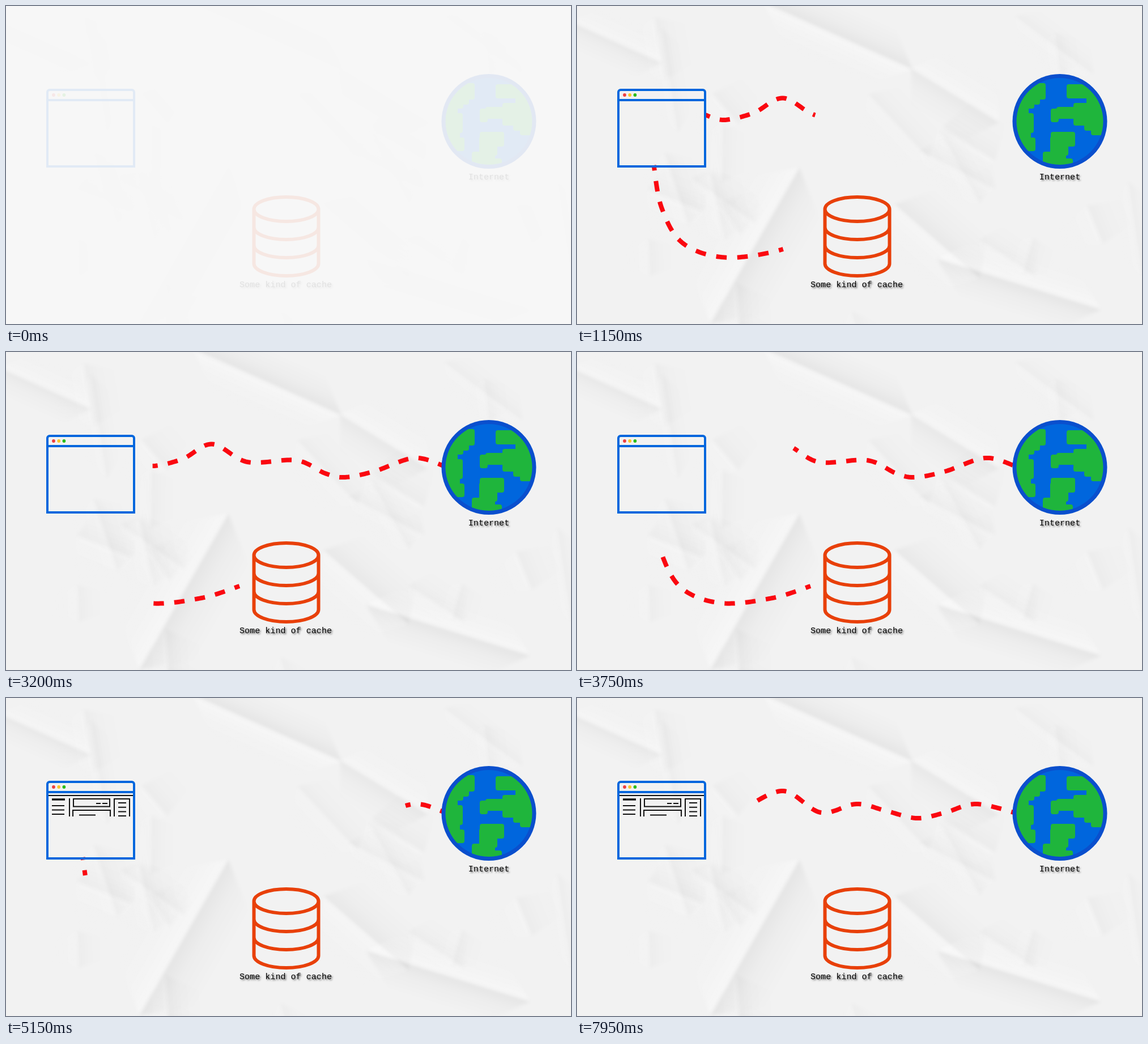
Animation, 997 px wide and 561 px high, one loop 8 s. Source, as an HTML page with a canvas:

```html
<!DOCTYPE html>
<html lang="en">
<head>
<meta charset="utf-8">
<title>Browser, cache and internet</title>
<style>
  html, body { margin: 0; width: 100%; height: 100%; overflow: hidden; background: #f8f8f8; }
  canvas { display: block; }
</style>
</head>
<body>
<canvas id="stage" width="997" height="561"></canvas>
<script>
const W = 997, H = 561, LOOP = 8000, STEP = 50;
const BLUE = '#0066dd', RED = '#fa0810', ORANGE = '#e8400a', GREEN = '#1fb53c', INK = '#111';
const ctx = document.getElementById('stage').getContext('2d');
const clamp01 = v => Math.min(1, Math.max(0, v));

// ---------- paper ----------

function seeded(seed) {
  return () => {
    seed = (seed * 1664525 + 1013904223) >>> 0;
    return seed / 2 ** 32;
  };
}

const gray = (v, alpha) => `rgba(${v},${v},${v},${alpha})`;

// shades one side of a fold, fading away from it
function shadeFold(g, x1, y1, x2, y2, w, tone, alpha) {
  const dx = x2 - x1, dy = y2 - y1, len = Math.hypot(dx, dy);
  const nx = -dy / len * w, ny = dx / len * w;
  const fade = g.createLinearGradient(x1, y1, x1 + nx, y1 + ny);
  fade.addColorStop(0, gray(tone, alpha));
  fade.addColorStop(.4, gray(tone, alpha * .4));
  fade.addColorStop(1, gray(tone, 0));
  g.fillStyle = fade;
  g.beginPath();
  g.moveTo(x1, y1);
  g.lineTo(x2, y2);
  g.lineTo(x1 + dx * .8 + nx, y1 + dy * .8 + ny);
  g.lineTo(x1 + dx * .2 + nx, y1 + dy * .2 + ny);
  g.fill();
}

function fold(g, x1, y1, x2, y2, w, depth) {
  shadeFold(g, x1, y1, x2, y2, -w, 0, depth);
  shadeFold(g, x1, y1, x2, y2, w, 255, depth * 8);
}

function makePaper() {
  const sheet = document.createElement('canvas');
  sheet.width = W;
  sheet.height = H;
  const g = sheet.getContext('2d');
  g.fillStyle = '#f2f2f2';
  g.fillRect(0, 0, W, H);
  g.filter = 'blur(3px)';
  const rnd = seeded(11);
  for (let i = 0; i < 24; i++) {
    const x = rnd() * W, y = rnd() * H, a = .3 + rnd() * 1.6, len = 60 + rnd() * 130;
    fold(g, x, y, x + len * Math.cos(a), y + len * Math.sin(a), 30 + rnd() * 50, .022);
  }
  // the deepest folds
  fold(g, 330, -5, 592, 112, 55, .05);
  fold(g, -10, 28, 150, 100, -45, .04);
  fold(g, 392, 285, 235, 560, 80, .05);
  fold(g, 560, 350, 710, 480, 70, .04);
  fold(g, 925, 535, 635, 445, 55, .05);
  fold(g, 590, 110, 745, 205, -60, .04);
  return sheet;
}

// ---------- dashed routes ----------

// Catmull-Rom curve through the points, with running length
function curve(pts) {
  const out = [];
  const at = i => pts[Math.min(pts.length - 1, Math.max(0, i))];
  for (let i = 0; i < pts.length - 1; i++) {
    const [a, b, c, d] = [at(i - 1), at(i), at(i + 1), at(i + 2)];
    for (let n = i ? 1 : 0; n <= 24; n++) {
      const u = n / 24;
      const mix = k => .5 * (2 * b[k] + (c[k] - a[k]) * u +
        (2 * a[k] - 5 * b[k] + 4 * c[k] - d[k]) * u * u +
        (3 * b[k] - a[k] - 3 * c[k] + d[k]) * u ** 3);
      const x = mix(0), y = mix(1), last = out[out.length - 1];
      out.push({ x, y, s: last ? last.s + Math.hypot(x - last.x, y - last.y) : 0 });
    }
  }
  return out;
}

function route(pts, dashes, draw, erase) {
  const line = curve(pts);
  const length = line[line.length - 1].s;
  return { line, length, period: length / dashes, draw, erase };
}

const toInternet = [[226, 192], [260, 201], [312, 188.5], [364, 162.5], [426, 194],
  [512, 191], [563, 214], [597, 221], [650, 210.5], [720, 187], [773, 201]];
const fromInternet = [[775, 203], [704, 187], [650, 202], [600, 212], [545, 199],
  [493, 187], [430, 202], [364, 164], [295, 195]];
const toCache = [[135.5, 281], [149, 355], [185, 417], [255, 443], [345, 434], [435, 403]];
const fromCache = [[412, 413], ...toCache.slice(0, -1).reverse()];

const ROUTES = [
  route(toInternet, 16, [50, 3050], [3060, 5440]),
  route(toCache, 11, [50, 1400], [1400, 2750]),
  route(fromCache, 10.5, [2675, 3965], [3968, 5258]),
  route(fromInternet, 14, [6250, 8034], [LOOP, LOOP + 1])
];

function drawRoute({ line, length, period, draw, erase }, t) {
  const along = ([from, to]) => length * clamp01((t - from) / (to - from));
  const head = along(draw), tail = along(erase);
  if (head <= tail) return;
  ctx.beginPath();
  for (let i = 1; i < line.length; i++) {
    const a = line[i - 1], b = line[i];
    if (b.s <= tail || a.s >= head) continue;
    const point = s => {
      const u = clamp01((s - a.s) / (b.s - a.s));
      return [a.x + (b.x - a.x) * u, a.y + (b.y - a.y) * u];
    };
    if (a.s <= tail) ctx.moveTo(...point(tail));
    ctx.lineTo(...point(head));
  }
  ctx.strokeStyle = RED;
  ctx.lineWidth = 8;
  ctx.setLineDash([period / 2, period / 2]);
  ctx.lineDashOffset = period / 4;
  ctx.stroke();
  ctx.setLineDash([]);
}

// ---------- icons ----------

function disc(x, y, r, color) {
  ctx.fillStyle = color;
  ctx.beginPath();
  ctx.arc(x, y, r, 0, 2 * Math.PI);
  ctx.fill();
}

function stroke(width, color, trace) {
  ctx.strokeStyle = color;
  ctx.lineWidth = width;
  ctx.beginPath();
  trace();
  ctx.stroke();
}

function rule(x1, x2, y) {
  ctx.moveTo(x1, y);
  ctx.lineTo(x2, y);
}

// a box open at the bottom
function bracket(x1, x2, top, bottom) {
  ctx.moveTo(x1, bottom);
  ctx.lineTo(x1, top);
  ctx.lineTo(x2, top);
  ctx.lineTo(x2, bottom);
}

function drawPage() {
  stroke(3.5, INK, () => rule(81, 104, 179));
  stroke(2, INK, () => {
    rule(75, 224, 172);
    for (let i = 0; i < 3; i++) rule(81, 103, 190 + 7.5 * i);
    for (let i = 0; i < 4; i++) rule(198, 212, 185 + 7.7 * i);
    ctx.moveTo(112, 177);
    ctx.lineTo(112, 209);
    ctx.rect(119, 178, 64, 13.5);
    rule(159, 167, 186);
    rule(170, 179, 186);
    bracket(118, 184, 198, 209);
    rule(129, 158, 206.5);
    bracket(191, 218, 178, 209);
  });
}

function drawBrowser(loaded) {
  if (loaded) drawPage();
  stroke(4, BLUE, () => {
    ctx.roundRect(73, 148, 153, 135, [4, 4, 0, 0]);
    rule(73, 226, 166);
  });
  ['#ee4040', '#fbc62c', '#2cbd1c'].forEach((color, i) => disc(84 + 9.2 * i, 157, 2.9, color));
}

function drawCache() {
  const x = 494.5, top = 358.5, rx = 57, ry = 21.5, gap = 32;
  stroke(6, ORANGE, () => {
    ctx.ellipse(x, top, rx, ry, 0, 0, 2 * Math.PI);
    for (let i = 1; i <= 3; i++) {
      ctx.moveTo(x + rx, top + gap * (i - 1));
      ctx.ellipse(x, top + gap * i, rx, ry, 0, 0, Math.PI);
      ctx.lineTo(x - rx, top + gap * (i - 1));
    }
  });
}

// blocks of land: x, y, width, height
const LAND = [
  [770, 136, 57, 29], [770, 150, 47, 24], [770, 165, 37, 16], [770, 175, 27, 18],
  [770, 189, 36, 35], [770, 215, 31, 22], [770, 232, 39, 24],
  [864, 138, 90, 25], [899, 145, 60, 50], [876, 171, 80, 40], [846, 178, 40, 21],
  [836, 181, 14, 24], [895, 180, 60, 40], [907, 180, 60, 48],
  [836, 222, 43, 26], [835, 230, 32, 34], [822, 257, 41, 35], [850, 269, 25, 24]
];

function drawGlobe() {
  disc(852, 203.5, 83.5, '#0a4fcd');
  disc(852, 203.5, 76.5, BLUE);
  ctx.save();
  ctx.clip();
  ctx.fillStyle = GREEN;
  ctx.beginPath();
  for (const block of LAND) ctx.roundRect(...block, 4);
  ctx.fill();
  ctx.restore();
}

function label(text, x, y) {
  ctx.save();
  ctx.font = '15.1px "Liberation Mono", "Noto Sans Mono", monospace';
  ctx.textAlign = 'center';
  ctx.fillStyle = '#000';
  ctx.shadowColor = 'rgba(0,0,0,.6)';
  ctx.shadowBlur = 3;
  ctx.shadowOffsetX = 2;
  ctx.shadowOffsetY = 2;
  ctx.fillText(text, x, y);
  ctx.restore();
}

// ---------- loop ----------

const paper = makePaper();
const start = performance.now();

function render(t) {
  ctx.drawImage(paper, 0, 0);
  for (const r of ROUTES) drawRoute(r, t);
  drawBrowser(t >= 3950);
  drawCache();
  drawGlobe();
  label('Some kind of cache', 493.5, 496);
  label('Internet', 852, 305.5);
  const veil = 1 - clamp01(.09 + t / 500);
  if (veil > 0) {
    ctx.fillStyle = gray(248, veil);
    ctx.fillRect(0, 0, W, H);
  }
}

function tick() {
  const t = (performance.now() - start) % LOOP;
  render(Math.floor(t / STEP) * STEP);
  requestAnimationFrame(tick);
}
tick();
</script>
</body>
</html>
```
